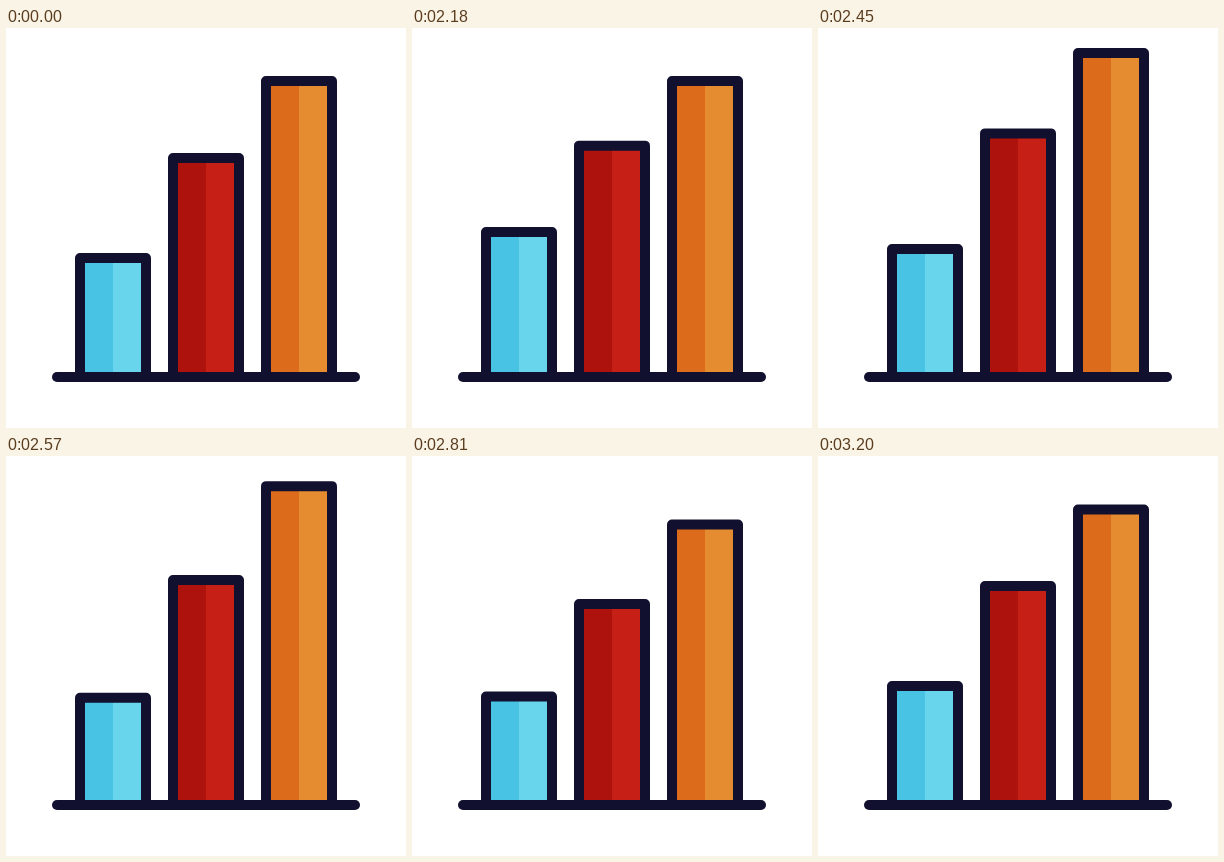
Animation of 400 by 400 pixels, one loop 3.23 s. Source, as an HTML page with a canvas:

```html
<!DOCTYPE html>
<html lang="en">
<head>
<meta charset="utf-8">
<title>Bar chart</title>
<style>
  html, body { margin: 0; width: 100%; height: 100%; overflow: hidden; background: #fff; }
  canvas { display: block; width: 100vw; height: 100vh; }
</style>
</head>
<body>
<canvas id="stage" width="400" height="400"></canvas>
<script>
const ctx = document.getElementById('stage').getContext('2d');

const LOOP = 3230, REST = 2030, STEP = 30, DELAY = 104;
const BASE_Y = 349, BAR_WIDTH = 66;
const INK = '#12102f';

const bars = [
  { x: 74, top: 230, dark: '#48c3e4', light: '#68d5ec' },
  { x: 167, top: 130, dark: '#ad120d', light: '#c51f16' },
  { x: 260, top: 53, dark: '#dc6c1c', light: '#e68c30' }
];

// Rise, dip below the resting height, then settle.
const moves = [
  { start: 2005, end: 2275, from: 0, to: -28.3, ease: bezier(0.25, 0.1, 0.25, 1) },
  { start: 2275, end: 2670, from: -28.3, to: 18.9, ease: bezier(0.364, 0, 0.636, 1) },
  { start: 2670, end: 3040, from: 18.9, to: 0, ease: bezier(0.3, 0.05, 0.5, 1) }
];

function bezier(x1, y1, x2, y2) {
  const at = (a, b, u) => 3 * (1 - u) ** 2 * u * a + 3 * (1 - u) * u * u * b + u ** 3;
  return x => {
    let lo = 0, hi = 1;
    for (let i = 0; i < 24; i++) {
      const mid = (lo + hi) / 2;
      if (at(x1, x2, mid) < x) lo = mid; else hi = mid;
    }
    return at(y1, y2, (lo + hi) / 2);
  };
}

function offsetAt(time) {
  const move = moves.find(m => time >= m.start && time < m.end);
  if (!move) return 0;
  const progress = (time - move.start) / (move.end - move.start);
  return move.from + (move.to - move.from) * move.ease(progress);
}

function drawBar({ x, top, dark, light }, offset) {
  const y = top + offset, half = BAR_WIDTH / 2;
  ctx.fillStyle = dark;
  ctx.fillRect(x, y, half, BASE_Y - y);
  ctx.fillStyle = light;
  ctx.fillRect(x + half, y, half, BASE_Y - y);
  ctx.beginPath();
  ctx.moveTo(x, BASE_Y);
  ctx.lineTo(x, y);
  ctx.lineTo(x + BAR_WIDTH, y);
  ctx.lineTo(x + BAR_WIDTH, BASE_Y);
  ctx.stroke();
}

function draw(time) {
  ctx.fillStyle = '#fff';
  ctx.fillRect(0, 0, 400, 400);
  ctx.strokeStyle = INK;
  ctx.lineWidth = 10;
  ctx.lineCap = ctx.lineJoin = 'round';
  bars.forEach((bar, i) => drawBar(bar, offsetAt(time - i * DELAY)));
  ctx.beginPath();
  ctx.moveTo(51, BASE_Y);
  ctx.lineTo(349, BASE_Y);
  ctx.stroke();
}

// The chart rests, then moves in steps of 30 ms.
function stepped(time) {
  return time < REST ? 0 : REST + Math.floor((time - REST) / STEP) * STEP;
}

const begin = performance.now();
function tick() {
  draw(stepped((performance.now() - begin) % LOOP));
  requestAnimationFrame(tick);
}
tick();
</script>
</body>
</html>
```
